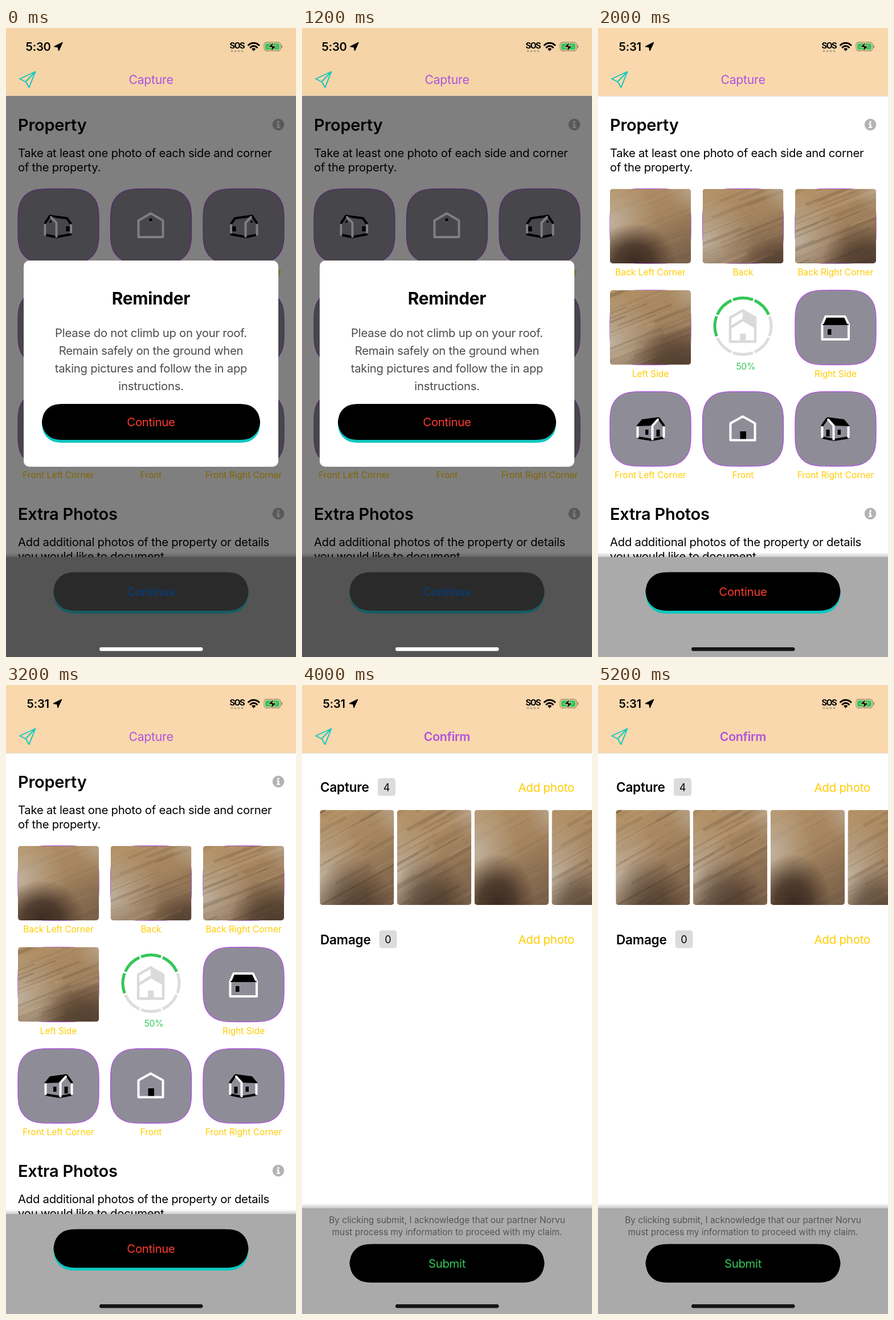
Recreate the animation shown at these times as an HTML page. Size 509 by 1101 pixels, loop 6000 ms.

```html
<!DOCTYPE html>
<html lang="en">
<head>
<meta charset="utf-8">
<title>Photo capture flow</title>
<style>
  html, body { margin: 0; width: 100%; height: 100%; overflow: hidden; background: #fff; }
  svg { display: block; }
  text { font-family: Inter, "Open Sans", sans-serif; font-optical-sizing: none; white-space: pre; }
  .sos { font-family: Roboto, sans-serif; }
</style>
</head>
<body>
<svg id="stage" width="509" height="1101" viewBox="0 0 509 1101"></svg>
<script>
const PURPLE = '#af52de', TEAL = '#0cc7c1', YELLOW = '#fc0', GREEN = '#34c759', RED = '#ff3b30';
const PEACH = '#fad8ad', FOOTER = '#aaa', TILE = '#8e8d97';
const COLS = [21, 183.5, 346], ROWS = [281.5, 459, 636.5];
let clipCount = 0;

const rect = (x, y, w, h, fill, r = 0) =>
  `<rect x="${x}" y="${y}" width="${w}" height="${h}" rx="${r}" fill="${fill}"/>`;
const circle = (x, y, r, fill) => `<circle cx="${x}" cy="${y}" r="${r}" fill="${fill}"/>`;
const shape = (d, fill) => `<path d="${d}" fill="${fill}"/>`;
const line = (d, color, width = 4) =>
  `<path d="${d}" fill="none" stroke="${color}" stroke-width="${width}" stroke-linecap="round" stroke-linejoin="round"/>`;
const text = (x, y, str, size, { fill = '#000', weight = 400, anchor = 'start', track = -.25, cls = '' } = {}) =>
  `<text x="${x}" y="${y}" font-size="${size}" fill="${fill}" font-weight="${weight}" text-anchor="${anchor}" letter-spacing="${track}" class="${cls}">${str}</text>`;
const centered = (x, y, str, size, fill, opts) => text(x, y, str, size, { fill, anchor: 'middle', ...opts });
const mirror = art => `<g transform="matrix(-1 0 0 1 509 0)">${art}</g>`;

// Continuous-curvature corner: distances from the corner along x and y, in radii
const CORNER = [[1.528, 0], [1.088, 0], [.868, 0], [.631, .075], [.373, .169],
  [.169, .373], [.075, .631], [0, .868], [0, 1.088], [0, 1.528]];

function softBox(x, y, w, h, r) {
  const corner = (right, bottom) => {
    const pts = CORNER.map(([a, b]) => {
      const dx = Math.min(a * r, w / 2), dy = Math.min(b * r, h / 2);
      return `${(right ? x + w - dx : x + dx).toFixed(2)} ${(bottom ? y + h - dy : y + dy).toFixed(2)}`;
    });
    return right === bottom ? pts.reverse() : pts;
  };
  const arc = pts => `${pts[0]}C${pts.slice(1).join(' ')}`;
  return 'M' + [corner(0, 0), corner(1, 0), corner(1, 1).reverse().reverse(), corner(0, 1)]
    .map((pts, i) => arc(i === 2 ? pts : pts)).join('L') + 'Z';
}

function button(x, y, w, h, label, color, { fill = '#000', edge } = {}) {
  const pill = dy => softBox(x, y + dy, w, h, h / 2);
  return (edge ? shape(pill(5), edge) : '') + shape(pill(0), fill) +
    centered(254.5, y + h / 2 + 7.3, label, 20.3, color);
}

function tile(x, y, icon = '') {
  return `<path d="${softBox(x, y, 142, 130.5, 42)}" fill="${TILE}" stroke="${PURPLE}" stroke-width="1.4"/>${icon}`;
}

function random(seed) {
  return () => (seed = seed * 16807 % 2147483647) / 2147483647;
}

// Wooden tabletop, darker at shadow [x, y, r] and paler at glare, in percent of the box
function photo(x, y, w, h, { shadow, dark = .6, glare = [0, 70, 65], grain = 1, seed }) {
  const id = 'clip' + clipCount++, rnd = random(seed * 991);
  const spot = ([cx, cy, r], paint, opacity = 1) =>
    `<circle cx="${cx}" cy="${cy}" r="${r}" fill="url(#${paint})" opacity="${opacity}"/>`;
  let streaks = '';
  for (let i = 0; i < 90; i++) {
    const x0 = rnd() * 130 - 60, y0 = rnd() * 150, len = 30 + rnd() * 90;
    const color = rnd() < .55 ? '#4e3826' : '#d2b68e';
    streaks += `<path d="M${x0.toFixed(1)} ${y0.toFixed(1)}l${len.toFixed(1)} ${(-len * .43).toFixed(1)}" stroke="${color}" stroke-width="${(.4 + rnd() ** 3 * 4).toFixed(2)}" opacity="${(.05 + rnd() * .17).toFixed(2)}"/>`;
  }
  return `<clipPath id="${id}">${rect(x, y, w, h, '#000', 5)}</clipPath>
    <g clip-path="url(#${id})"><svg x="${x}" y="${y}" width="${w}" height="${h}" viewBox="0 0 100 100" preserveAspectRatio="none">
    ${rect(0, 0, 100, 100, 'url(#wood)')}${spot(glare, 'glare')}<g opacity="${grain}">${streaks}</g>
    ${spot([104, 0, 34], 'glare', .7)}${spot(shadow, 'shade', dark)}</svg></g>`;
}

const SHOTS = {
  blurry: { shadow: [30, 98, 52], dark: 1, glare: [0, 45, 60], grain: .25, seed: 3 },
  back: { shadow: [95, 108, 50], dark: .6, seed: 5 },
  right: { shadow: [86, 100, 54], dark: .7, seed: 8 },
  left: { shadow: [80, 102, 58], dark: .65, seed: 11 }
};

const defs = `<defs>
  <linearGradient id="wood" x1=".25" y1="0" x2=".7" y2="1">
    <stop offset="0" stop-color="#b29167"/><stop offset=".45" stop-color="#a4845f"/><stop offset="1" stop-color="#7b614a"/>
  </linearGradient>
  <radialGradient id="shade"><stop offset="0" stop-color="#3b2b22"/><stop offset=".45" stop-color="#3f2e23" stop-opacity=".8"/><stop offset="1" stop-color="#4a3628" stop-opacity="0"/></radialGradient>
  <radialGradient id="glare"><stop offset="0" stop-color="#c6bcae" stop-opacity=".8"/><stop offset="1" stop-color="#c3b199" stop-opacity="0"/></radialGradient>
  <linearGradient id="lift" x1="0" y1="0" x2="0" y2="1"><stop offset="0" stop-opacity="0"/><stop offset="1" stop-opacity=".2"/></linearGradient>
</defs>`;

function header(time, timeX, title, bg, weight) {
  const arrowX = time === '5:30' ? 1.5 : 0;
  let dots = '';
  for (let i = 0; i < 4; i++) dots += circle(396.5 + i * 6, 40.5, 1.9, '#bda78a');
  return rect(0, 0, 509, 118.5, bg) +
    text(timeX, 40, time, 20.3, { weight: 600 }) +
    `<g transform="translate(${arrowX})">${line('M97.5 25.5L83.5 32.5L90 33.5L91 39.5Z', '#000', 1.5)}${shape('M98 25L83 32.5L90 33.5L91 40Z', '#000')}</g>` +
    text(392.5, 36, 'SOS', 15.5, { weight: 700, track: -1.4, cls: 'sos' }) + dots +
    line('M425.5 30a13 13 0 0 1 18.5 0', '#000', 3) + line('M429 34a8 8 0 0 1 11.5 0', '#000', 3) +
    shape('M434.7 40.5l-3.6-3.7a5.2 5.2 0 0 1 7.2 0Z', '#000') +
    `<rect x="453" y="25" width="29" height="15" rx="4.5" fill="none" stroke="#9b8a70" stroke-width="1.3"/>` +
    rect(455, 27, 25, 11, GREEN, 2.8) + rect(483, 30, 2, 5, '#9b8a70', 1) +
    `<path d="M469.5 24.5L460 33.8H466.5L464.8 41L474.5 31.4H467.8Z" fill="#000" stroke="${bg}" stroke-width="1"/>` +
    line('M51.5 76.5L24 89L34.5 94L40.5 104Z M34.5 94L51.5 76.5', TEAL, 1.9) +
    centered(254.5, 98, title, 21.2, PURPLE, { weight });
}

const headerRule = rect(0, 118.5, 509, 1, '#d9c4a5');
const homeBar = color => rect(164, 1084, 181.5, 6.5, color, 3.25);
const footer = y => rect(0, y - 8, 509, 8, 'url(#lift)') + rect(0, y, 509, 1101 - y, FOOTER);

const info = y => circle(478, y, 10.3, '#b3b3b3') + circle(478, y - 4.6, 1.8, '#fff') +
  shape(`M475 ${y - 1.8}h4.4v5.6h1.8v2h-6.4v-2h1.9v-3.6h-1.7Z`, '#fff');

const backCorner = line('M69 341L77 329L107 333L114 343M69 362L88 366L114 361', '#000') +
  rect(105.5, 347, 8, 9, '#000') + circle(78, 339, 2, '#000') +
  line('M68.5 345V362M79 331L88.5 341V365M114 345V358', '#fff');
const backFace = line('M232.5 337L254 324.5L275.5 337V366H232.5Z', '#fff') + circle(254, 335.5, 2.6, '#000');
const frontCorner = shape('M67 697L77 685L107 681L95 696Z', '#000') +
  line('M107 684L115.5 696M70 717L95 721L115 717', '#000') +
  rect(83, 703, 5.5, 9, '#000') + rect(102.5, 703, 6, 12, '#000') +
  line('M69.5 699V716M95.5 720V696L105 685.5M115.5 699V716', '#fff');
const frontFace = rect(249.5, 706, 10.5, 14, '#000') +
  line('M232.5 692L254 680L275.5 692V721.5H232.5Z', '#fff');
const sideFace = shape('M400 505H433L440 518H393Z', '#000') + rect(403, 527, 6.5, 10, '#000') +
  line('M393.5 519L399.5 505H433.5L440 519V545H393.5Z', '#fff') + line('M395 519H439', '#000', 2);

function progress() {
  const ring = (color, dash) => `<circle cx="254.5" cy="522" r="49.5" pathLength="8" fill="none" stroke="${color}" stroke-width="5" stroke-dasharray="${dash}" transform="rotate(159.3 254.5 522)"/>`;
  const on = '.92 .08 ';
  return ring('#dcdedd', on) + ring(GREEN, on.repeat(3) + '.92 8') +
    line('M232 507L254 494.5L276 507V549H232ZM233 524L254 511', '#d9dada', 4.5) +
    shape('M254 494L276 507V526L254 513Z', '#d9dada') + rect(249, 535, 10.5, 14, '#d9dada') +
    centered(259.5, 598, '50%', 15.5, GREEN, { track: 0 });
}

function captureBody(filled) {
  const shot = (col, row, kind, icon) => tile(COLS[col], ROWS[row], filled ? '' : icon) +
    (filled ? photo(COLS[col], ROWS[row], 142, 130.5, SHOTS[kind]) : '');
  const captions = [
    ['Back Left Corner', 'Back', 'Back Right Corner'],
    ['Left Side', '', 'Right Side'],
    ['Front Left Corner', 'Front', 'Front Right Corner']
  ].map((row, r) => row.map((name, c) =>
    centered(COLS[c] + 71, ROWS[r] + 151.5, name, 15.5, YELLOW, { track: 0 })).join('')).join('');
  const section = (y, title, a, b) => text(21, y, title, 29, { weight: 600 }) + info(y - 11) +
    text(21, y + 45.5, a, 20.3) + text(21, y + 70.5, b, 20.3);
  return rect(0, 118.5, 509, 983, '#fff') +
    section(180, 'Property', 'Take at least one photo of each side and corner', 'of the property.') +
    shot(0, 0, 'blurry', backCorner) + shot(1, 0, 'back', backFace) + shot(2, 0, 'right', mirror(backCorner)) +
    shot(0, 1, 'left', '') + progress() + tile(COLS[2], ROWS[1], sideFace) +
    tile(COLS[0], ROWS[2], frontCorner) + tile(COLS[1], ROWS[2], frontFace) + tile(COLS[2], ROWS[2], mirror(frontCorner)) +
    captions +
    section(861, 'Extra Photos', 'Add additional photos of the property or details', 'you would like to document.') +
    footer(926);
}

function reminderScreen() {
  const lines = ['Please do not climb up on your roof.', 'Remain safely on the ground when',
    'taking pictures and follow the in app', 'instructions.'];
  return captureBody(false) + rect(0, 118.5, 509, 983, 'rgba(0,0,0,.5)') +
    header('5:30', 34.5, 'Capture', '#f5d4a8', 400) +
    button(83.5, 952.5, 342, 67.5, 'Continue', '#003f87', { fill: '#2a2a2a', edge: '#185c63' }) +
    rect(31, 407, 447, 361, '#fff', 10) +
    centered(254.5, 484, 'Reminder', 29.8, '#000', { weight: 700 }) +
    lines.map((s, i) => centered(254.5, 540.5 + i * 31.2, s, 20.3, '#4c4c4c')).join('') +
    button(63, 658, 383, 63, 'Continue', RED, { edge: TEAL }) + homeBar('#fff');
}

function captureScreen() {
  return captureBody(true) + header('5:31', 36.5, 'Capture', PEACH, 400) + headerRule +
    button(83.5, 952.5, 342, 67.5, 'Continue', RED, { edge: TEAL }) + homeBar('#141414');
}

function confirmScreen() {
  const group = (y, title, count, badgeX) => text(32, y, title, 22.6, { weight: 600 }) +
    rect(badgeX, y - 24, 31, 31, '#dcdcdc', 4.5) + centered(badgeX + 15.5, y - 1.5, count, 18, '#000', { track: 0 }) +
    text(478, y - .5, 'Add photo', 20.5, { fill: YELLOW, anchor: 'end' });
  const strip = [
    { ...SHOTS.left, shadow: [45, 104, 55], seed: 14 }, { ...SHOTS.right, shadow: [45, 104, 55] },
    SHOTS.blurry, { ...SHOTS.back, shadow: [35, 104, 45] }
  ].map((kind, i) => photo(31.3 + i * 135.7, 218.5, 130.3, 166.5, kind)).join('');
  return rect(0, 118.5, 509, 983, '#fff') + header('5:31', 36.5, 'Confirm', PEACH, 600) + headerRule +
    group(187, 'Capture', 4, 133) + strip + group(453.5, 'Damage', 0, 135.5) + footer(915.5) +
    centered(254.5, 942, 'By clicking submit, I acknowledge that our partner Norvu', 15.45, '#555', { track: 0 }) +
    centered(254.5, 963, 'must process my information to proceed with my claim.', 15.45, '#555', { track: 0 }) +
    button(83.5, 978.5, 342, 67.5, 'Submit', GREEN) + homeBar('#141414');
}

const screens = [reminderScreen(), captureScreen(), confirmScreen()];
const stage = document.getElementById('stage');
stage.innerHTML = defs + screens.map(s => `<g class="screen">${s}</g>`).join('');

stage.querySelectorAll('.screen').forEach((screen, i) => {
  const steps = [0, 1, 2, 3].map(k => ({
    offset: k / 3, opacity: Math.min(k, 2) === i ? 1 : 0, easing: 'step-end'
  }));
  screen.animate(steps, { duration: 6000, iterations: Infinity });
});
</script>
</body>
</html>
```
